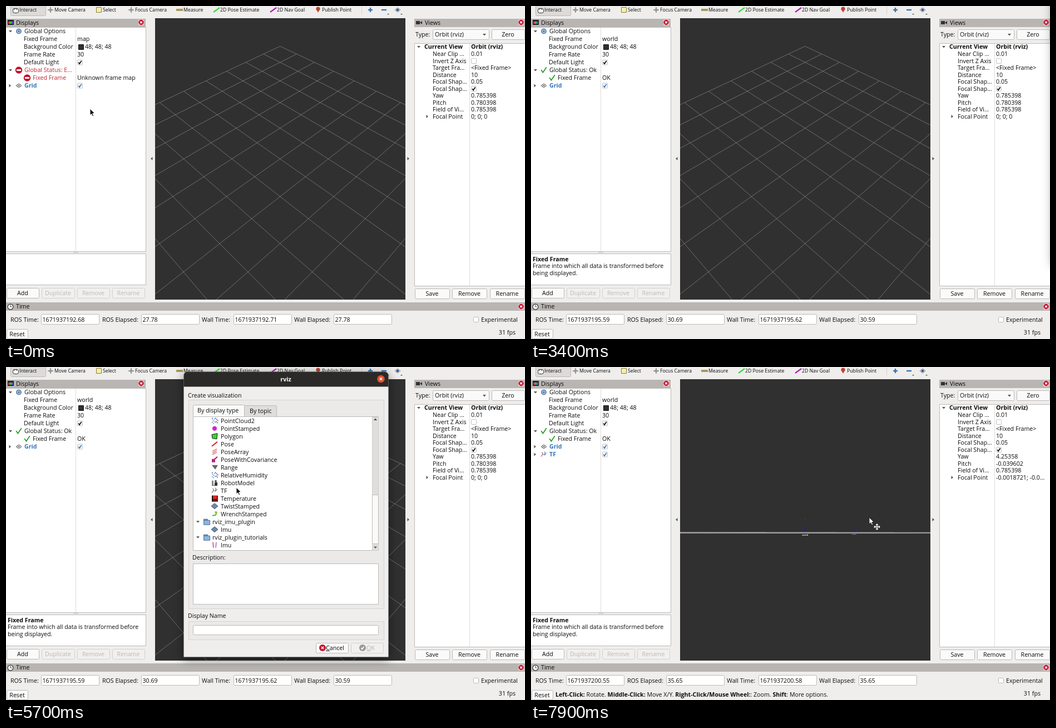
Animation, 933 px wide and 600 px high, one loop 8 s. Source, as an HTML page with a canvas:

```html
<!DOCTYPE html>
<html lang="en">
<head>
<meta charset="utf-8">
<style>
html, body { margin: 0; width: 100%; height: 100%; overflow: hidden; background: #efeeed; }
canvas { display: block; width: 933px; height: 600px; }
</style>
</head>
<body>
<canvas id="stage" width="933" height="600"></canvas>
<script>
const ctx = document.getElementById('stage').getContext('2d');
const INK = '#0c0c0c', BG = '#efeeed', BAR = '#b8b5b2', EDGE = '#bdbab7', BLUE = '#2f86bd', RED = '#c3142d', GREEN = '#1f9a25';
const SIZE = 10.65;

// ---- basic drawing helpers ----
function text(s, x, y, color = INK, bold = false, size = SIZE, align = 'left') {
  ctx.font = `${bold ? 700 : 500} ${size}px "Open Sans", sans-serif`;
  ctx.fillStyle = color;
  ctx.textAlign = align;
  ctx.fillText(s, x, y + size * .36);
  return ctx.measureText(s).width;
}
function rect(x, y, w, h, fill, stroke, r = 0) {
  ctx.beginPath();
  ctx.roundRect(x + .5, y + .5, w, h, r);
  if (fill) { ctx.fillStyle = fill; ctx.fill(); }
  if (stroke) { ctx.strokeStyle = stroke; ctx.lineWidth = 1; ctx.stroke(); }
}
function fill(x, y, w, h, color) { ctx.fillStyle = color; ctx.fillRect(x, y, w, h); }
function dot(x, y, r, color) {
  ctx.fillStyle = color;
  ctx.beginPath(); ctx.arc(x, y, r, 0, 7); ctx.fill();
}
function path(points, color, width = 1, x = 0, y = 0) {
  ctx.beginPath();
  for (let i = 0; i < points.length; i += 2) ctx.lineTo(x + points[i], y + points[i + 1]);
  ctx.strokeStyle = color; ctx.lineWidth = width; ctx.stroke();
}
function poly(points, color, x = 0, y = 0, outline) {
  ctx.beginPath();
  for (let i = 0; i < points.length; i += 2) ctx.lineTo(x + points[i], y + points[i + 1]);
  ctx.closePath();
  ctx.fillStyle = color; ctx.fill();
  if (outline) { ctx.strokeStyle = outline; ctx.lineWidth = 1; ctx.stroke(); }
}
const down = (x, y) => poly([-3, -1.5, 3, -1.5, 0, 2], '#555', x, y);
const right = (x, y) => poly([-1.5, -3, 2, 0, -1.5, 3], '#555', x, y);
const left = (x, y) => poly([1.5, -3, -2, 0, 1.5, 3], '#555', x, y);
const tick = (x, y, color = INK, s = 1) => path([-3 * s, 0, -s, 3 * s, 3 * s, -3 * s], color, 1.7, x, y);
function cross(x, y, r, color = '#fff') {
  path([-r, -r, r, r], color, 1.4, x, y);
  path([-r, r, r, -r], color, 1.4, x, y);
}
function button(x, y, w, h, label, off) {
  rect(x, y, w, h, off ? '#f1f0ef' : '#fafafa', off ? '#d3d1cf' : EDGE, 2);
  text(label, x + w / 2, y + h / 2 + .5, off ? '#bbb9b7' : INK, false, SIZE, 'center');
}
function check(x, y, on, color) {
  rect(x - 5, y - 5, 9, 9, '#fff', '#c4c1be', 1);
  if (on) tick(x, y, color, .9);
}
function titleBar(label, x, y, w, textX) {
  fill(x, y, w, 15, BAR);
  text(label, textX, y + 7.5);
}
function closeBox(x, y) {
  rect(x - 6, y - 6, 11, 11, '#f4eeee', '#cfa9ad', 3);
  dot(x, y, 4.7, RED);
  cross(x, y, 1.8);
}

// Linear interpolation through rows of [time, value, value...]
function key(t, rows) {
  const i = rows.findIndex(r => r[0] > t);
  if (i < 0) return rows.at(-1).slice(1);
  if (i === 0) return rows[0].slice(1);
  const a = rows[i - 1], b = rows[i], k = (t - a[0]) / (b[0] - a[0]);
  return a.slice(1).map((v, j) => v + (b[j + 1] - v) * k);
}

// ---- small icons, centred on x, y ----
const icons = {
  folder(x, y) { rect(x - 6, y - 5, 7, 4, '#6f9ac8', '#4a6f99'); rect(x - 6, y - 3, 11, 8, '#8fb4dc', '#4a6f99'); },
  diamond(x, y) { poly([0, -5, 6, 0, 0, 5, -6, 0], '#6f87ab', x, y, '#46566f'); },
  grid(x, y) {
    path([0, -3.5, 5, 0, 0, 3.5, -5, 0, 0, -3.5], '#555', 1, x, y);
    path([-2.5, -1.8, 2.5, 1.8], '#555', 1, x, y); path([2.5, -1.8, -2.5, 1.8], '#555', 1, x, y);
  },
  axes(x, y) { path([0, -5, 0, 1], '#2238b0', 1.6, x, y); path([0, 1, -5, 5], RED, 1.6, x, y); path([0, 1, 5, 4], '#2a9a2a', 1.4, x, y); },
  tf(x, y) {
    path([-5, 4, -2, 0, -3, -4], '#8a3030', 1, x, y); path([-2, 0, 2, 1, 5, -3], '#557a55', 1, x, y);
    path([2, 1, 2, -5], '#3344b0', 1, x, y);
  },
  robot(x, y) { fill(x - 5, y - 4, 3, 8, '#888'); fill(x, y - 1, 5, 6, '#333'); dot(x + 2, y - 3, 2, '#555'); fill(x - 5, y + 4, 10, 1, '#333'); },
  green(x, y) { fill(x - 5, y - 5, 4, 4, '#24d324'); fill(x + 1, y - 4, 4, 4, '#24d324'); fill(x - 4, y + 1, 8, 4, '#24d324'); },
  scene(x, y) { fill(x - 5, y - 5, 7, 3, '#222'); fill(x - 5, y, 4, 5, '#222'); fill(x, y - 1, 6, 6, '#24c324'); },
  curve(x, y) { path([-5, 5, -3, 0, 1, -3, 6, -4], '#40dd40', 2.5, x, y); },
  arrow(x, y) { path([-2, -5, 3, 0, -2, 5], '#318fc0', 2.4, x, y); },
  dark(x, y) { dot(x, y, 5, '#3e4a58'); dot(x + 1, y - 1, 2, '#8fa6bb'); },
  cloud(x, y) { fill(x - 6, y - 3, 12, 3, '#333'); fill(x - 4, y + 1, 8, 3, '#444'); },
  meter(x, y) { fill(x - 5, y - 5, 11, 11, '#252b55'); fill(x + 1, y - 4, 3, 9, '#e2d34a'); fill(x - 4, y - 2, 3, 4, '#ddd'); },
  brush(x, y) { path([-5, -5, 1, 1], '#333', 2, x, y); fill(x - 1, y + 1, 6, 4, '#c6a23c'); },
  frame(x, y) { rect(x - 5, y - 5, 10, 10, '#e6ecf2', '#44566f'); fill(x - 2, y - 2, 5, 5, '#566f93'); },
  points(x, y) { for (let i = 0; i < 12; i++) fill(x - 5 + i * 5 % 11, y - 5 + i * 7 % 10, 1.6, 1.6, i % 2 ? '#4b8fd0' : '#3b3b88'); },
  ball(x, y) { dot(x, y, 4, '#d322d3'); },
  polygon(x, y) { poly([-5, -3, 5, -5, 4, 5, -4, 4], '#35d335', x, y, '#222'); },
  pose(x, y) { path([-5, 4, 5, -4], '#d12222', 2, x, y); },
  poses(x, y) { for (const d of [-3, 0, 3]) path([-4, d + 2, 4, d - 2], '#d14444', 1.2, x, y); },
  covariance(x, y) { path([-4, 3, 5, -5], '#c21d3d', 2, x, y); fill(x - 5, y - 1, 6, 6, '#bd1e8a'); },
  range(x, y) { poly([-5, -4, 6, -4, 1, 4], '#666', x, y); },
  heat(x, y) { fill(x - 5, y - 5, 11, 11, '#701111'); fill(x - 3, y - 5, 7, 6, '#e62222'); fill(x - 5, y - 5, 2, 10, '#111'); },
  wrench(x, y) { path([-4, 3, 2, 2, 4, -4], '#3fbb3f', 2, x, y); dot(x + 2, y - 3, 2, '#d0b030'); },
  bars(x, y) { path([-3, -5, -2, 5], '#d06aa8', 2, x, y); path([3, -5, 2, 5], '#bb86cf', 2, x, y); },
  error(x, y) { dot(x, y, 6.2, RED); fill(x - 4, y - 1.5, 8, 3, '#fff'); },
  gear(x, y) { dot(x, y, 5, '#5f86b0'); dot(x, y, 3.2, '#a9c4e0'); dot(x, y, 1.5, '#476c96'); },
  move(x, y) { path([-5, 0, 5, 0], '#777', 1.4, x, y); path([0, -5, 0, 5], '#777', 1.4, x, y); dot(x, y, 2.6, '#999'); }
};

// ---- main window ----
function toolbar() {
  rect(8, -3, 63, 20, '#dddbd9', '#bbb8b5', 2);
  const item = (s, x) => text(s, x, 7, INK, false, 8.7);
  hand(17, 7);
  item('Interact', 24);
  icons.move(80, 7); item('Move Camera', 87);
  rect(162, 2, 9, 9, '#f7efa8', '#857c3a'); item('Select', 174);
  icons.move(225, 7); item('Focus Camera', 232);
  fill(306, 5, 12, 4, '#a99a55'); item('Measure', 319);
  path([373, 11, 384, 3], '#3bdc3b', 2.4); item('2D Pose Estimate', 385);
  path([475, 11, 486, 3], '#b422b4', 2.4); item('2D Nav Goal', 487);
  dot(561, 5, 3.6, '#b94433'); poly([-3, 6, 3, 6, 0, 12], '#b94433', 561, 0); item('Publish Point', 568);
  fill(639, 1, 1, 14, '#d5d3d1');
  path([651, 7, 659, 7], '#3474b5', 2.4); path([655, 3, 655, 11], '#3474b5', 2.4);
  path([675, 7, 684, 7], '#3474b5', 2.4);
  poly([-2, 0, 2, 0, 0, 2], '#555', 687, 14); poly([-2, 0, 2, 0, 0, 2], '#555', 711, 14);
  poly([-5, 0, 0, -4, 5, 0, 0, 4], '#d5dce5', 704, 7, '#889'); dot(704, 7, 2.3, '#335a8c');
}

function displays(t) {
  titleBar('Displays', 0, 23, 251, 18);
  rect(3, 25, 10, 8, '#2a3040', '#111'); fill(4, 28, 3, 4, '#e33'); fill(7, 28, 3, 4, '#3c3'); fill(10, 28, 3, 4, '#55f');
  closeBox(243, 29.5);
  rect(-1, 38, 252, 404, '#fff', EDGE);
  fill(125, 39, 1, 403, '#dedcda');
  const ok = t >= 2200, selected = t >= 600 && t < 2300, editing = t >= 1000 && t < 2300;
  const frameName = t < 2000 ? 'map' : 'world', tf = t >= 6400;
  if (selected) { fill(0, 53, 125, 13, BLUE); if (!editing) fill(125, 53, 126, 13, BLUE); }
  const row = (i, x, a, b, bx = 128, color = INK) => { text(a, x, 45.5 + i * 14, color); text(b, bx, 45.5 + i * 14); };
  down(8, 45.5); icons.gear(23, 45.5);
  row(0, 33, 'Global Options', '');
  text('Fixed Frame', 32, 59.5, selected ? '#fff' : INK);
  text(frameName, 128, 59.5, selected && !editing ? '#fff' : INK);
  row(2, 32, 'Background Color', '48; 48; 48', 142);
  rect(130, 69, 9, 9, '#303030', '#111');
  row(3, 32, 'Frame Rate', '30');
  row(4, 32, 'Default Light', ''); check(133, 101.5, true);
  down(8, 115.5);
  if (ok) { tick(23, 115, GREEN, 1.6); tick(38, 129, GREEN, 1.6); }
  else { icons.error(23, 115.5); icons.error(38, 129.5); }
  row(5, 33, ok ? 'Global Status: Ok' : 'Global Status: E…', '', 0, ok ? INK : '#bd2633');
  row(6, 48, 'Fixed Frame', ok ? 'OK' : 'Unknown frame map', 128, ok ? INK : '#bd2633');
  ['Grid', 'TF'].slice(0, tf ? 2 : 1).forEach((name, i) => {
    const y = 143.5 + i * 14;
    right(7, y); icons[name.toLowerCase()](23, y);
    text(name, 33, y, '#3577b5', true); check(133, y, true, '#3577b5');
  });
  if (editing) {
    rect(125, 52, 125, 14, '#fff', '#5d9ccb');
    const w = text(frameName, 129, 59.5);
    fill(129.5 + w, 54, 1, 11, '#111');
    fill(235, 53, 1, 13, '#9cc2de'); down(242, 60);
  }
  if (t >= 1500 && t < 2000) {
    rect(125, 67, 125, 43, '#fff', EDGE);
    const hover = t < 1800 ? 0 : 2;
    fill(126, 68 + hover * 14, 124, 14, BLUE);
    ['map', 'turtle1', 'world'].forEach((s, i) => text(s, 129, 75 + i * 14, i === hover ? '#fff' : INK));
  }
  rect(-1, 446, 252, 56, '#fff', EDGE);
  fill(121, 443.5, 9, 1, '#bbb');
  if (t >= 600) {
    text('Fixed Frame', 3, 456, INK, true);
    text('Frame into which all data is transformed before', 3, 468.5);
    text('being displayed.', 3, 481);
  }
  button(1, 508, 58, 18, 'Add');
  button(64, 508, 59, 18, 'Duplicate', true);
  button(128, 508, 58, 18, 'Remove', true);
  button(191, 508, 58, 18, 'Rename', true);
}

function views(yaw, pitch, focal) {
  titleBar('Views', 734, 23, 199, 753);
  fill(737, 27, 7, 6, '#333'); poly([744, 30, 748, 27, 748, 33], '#333');
  closeBox(926, 29.5);
  text('Type:', 736, 51.5);
  rect(767, 42, 101, 18, '#fafafa', EDGE, 2); text('Orbit (rviz)', 771, 51.5); down(860, 51.5);
  button(873, 42, 59, 18, 'Zero');
  rect(734, 67, 200, 437, '#fff', EDGE);
  fill(833, 68, 1, 436, '#dedcda');
  down(742, 73.5); right(757, 199);
  const rows = [['Near Clip …', '0.01'], ['Invert Z Axis', ''], ['Target Fra…', '<Fixed Frame>'], ['Distance', '10'],
    ['Focal Shap…', '0.05'], ['Focal Shap…', ''], ['Yaw', yaw], ['Pitch', pitch], ['Field of Vi…', '0.785398'], ['Focal Point', focal]];
  text('Current View', 752, 73.5, INK, true); text('Orbit (rviz)', 836, 73.5, INK, true);
  rows.forEach(([a, b], i) => { const y = 86.2 + i * 12.55; text(a, 767, y); text(b, 836, y); });
  check(841, 99, false); check(841, 149, true);
  button(735, 509, 62, 18, 'Save');
  button(802, 509, 62, 18, 'Remove');
  button(870, 509, 62, 18, 'Rename');
}

function timePanel(t) {
  titleBar('Time', 0, 534, 933, 18);
  dot(8, 542, 5.5, '#333'); dot(8, 542, 4.3, '#fff'); path([8, 538.5, 8, 542, 10.5, 542], '#333');
  closeBox(926, 541.5);
  const clock = key(t, [[0, 0], [1300, 1.25], [2900, 2.91], [6300, 2.91], [6400, 6.35], [6800, 6.75], [7900, 7.87]])[0];
  const lag = t === 0 || t >= 7500 ? 0 : t < 6400 ? .1 : .03;
  const fields = [['ROS Time:', 8, 63, 1671937192.68], ['ROS Elapsed:', 173, 243, 27.78],
    ['Wall Time:', 352, 409, 1671937192.71], ['Wall Elapsed:', 518, 589, 27.78 - lag]];
  for (const [label, x, boxX, start] of fields) {
    text(label, x, 565.5);
    rect(boxX, 555, 104, 18, '#fff', EDGE, 2);
    text((start + clock).toFixed(2), boxX + 2.5, 565);
  }
  rect(840, 560, 9, 9, '#fff', EDGE, 1); text('Experimental', 854, 565.5);
  button(1, 582, 38, 17, 'Reset');
  text(t >= 6400 && t < 7000 ? '0 fps' : '31 fps', 916, 588.5, INK, false, SIZE, 'right');
  if (t >= 6400) {
    let x = 44;
    ['Left-Click:', ' Rotate. ', 'Middle-Click:', ' Move X/Y. ', 'Right-Click/Mouse Wheel:', ': Zoom. ', 'Shift', ': More options.']
      .forEach((s, i) => x += text(s, x, 590.5, INK, i % 2 === 0));
  }
}

// ---- 3D view: orbit camera at distance 10 ----
function scene(yaw, pitch, lift, tf) {
  const cy = Math.cos(yaw), sy = Math.sin(yaw), cp = Math.cos(pitch), sp = Math.sin(pitch);
  const toCamera = ([x, y, z]) => {
    const a = x * cy + y * sy, h = z - lift;
    return [y * cy - x * sy, h * cp - a * sp, 10 - a * cp - h * sp];
  };
  const toScreen = ([x, y, d]) => [492.7 + 613 * x / d, 275.5 - 613 * y / d];
  const line = (p, q, color, width) => {
    let a = toCamera(p), b = toCamera(q);
    if (a[2] < b[2]) [a, b] = [b, a];
    const near = .05;
    if (a[2] < near) return;
    if (b[2] < near) {
      const k = (a[2] - near) / (a[2] - b[2]);
      b = a.map((v, i) => v + (b[i] - v) * k);
    }
    path([...toScreen(a), ...toScreen(b)], color, width);
  };
  const frames = tf ? [['world', 0], ['turtle1', 5.544]] : [];
  ctx.save();
  ctx.beginPath(); ctx.rect(268, 22, 450, 507); ctx.clip();
  fill(268, 22, 450, 507, '#303030');
  if (tf) line([0, 0, 0], [5.544, 5.544, 0], '#8c8c4c', 1);
  for (const [, p] of frames) {
    line([p, p, 0], [p + .2, p, 0], '#c01818', 1.4);
    line([p, p, 0], [p, p + .2, 0], '#18b018', 1.4);
    line([p, p, 0], [p, p, .2], '#1818c0', 1.4);
  }
  for (let i = -5; i <= 5; i++) {
    line([i, -5, 0], [i, 5, 0], 'rgba(160,160,164,.62)', .9);
    line([-5, i, 0], [5, i, 0], 'rgba(160,160,164,.62)', .9);
  }
  for (const [name, p] of frames) {
    const c = toCamera([p, p, -.04]);
    if (c[2] < .5) continue;
    const [x, y] = toScreen(c);
    text(name, x, y + 1, '#eee', true, Math.min(38 / c[2], 20), 'center');
  }
  if (lift) fill(492, 274.5, 1.5, 1, '#555');
  ctx.restore();
  left(262, 275); right(723, 275);
}

// ---- "create visualization" dialog ----
const plugins = `-moveit_ros_visualization MotionPlanning:arrow PlanningScene:scene RobotState:robot Trajectory:curve -rviz
 AccelStamped:diamond Axes:axes Camera:frame DepthCloud:cloud Effort:dark FluidPressure:meter Grid:grid GridCells:green
 Group:folder Illuminance:brush Image:frame InteractiveMarkers:arrow LaserScan:points Map:grid Marker:ball MarkerArray:green
 Odometry:poses Path:curve PointCloud:points PointCloud2:points PointStamped:ball Polygon:polygon Pose:pose PoseArray:poses
 PoseWithCovariance:covariance Range:range RelativeHumidity:points RobotModel:robot TF:tf Temperature:heat
 TwistStamped:diamond WrenchStamped:wrench -rviz_imu_plugin Imu:diamond -rviz_plugin_tutorials Imu:bars`.split(/\s+/);

function dialog(x, y, scroll, chosen) {
  ctx.save();
  ctx.translate(x, y);
  ctx.shadowColor = 'rgba(0,0,0,.5)'; ctx.shadowBlur = 18; ctx.shadowOffsetY = 4;
  rect(0, 0, 368, 514, BG, null, [7, 7, 0, 0]);
  ctx.shadowColor = 'transparent';
  rect(0, 0, 368, 27, '#2b2a29', null, [7, 7, 0, 0]);
  text('rviz', 184, 14, '#fff', true, SIZE, 'center');
  dot(355, 13.5, 6.8, '#e0512f'); cross(355, 13.5, 2.3);
  text('Create visualization', 8, 43);
  rect(9, 51, 351, 376, '#ebeae9', '#d6d4d2');
  rect(109, 61, 58, 20, '#dfdddb', EDGE, 2); text('By topic', 119, 71);
  rect(17, 60, 92, 22, '#fafafa', EDGE, 2); text('By display type', 25, 70.5);
  rect(17, 81, 333, 241, '#fff', EDGE);
  ctx.save();
  ctx.beginPath(); ctx.rect(18, 82, 321, 240); ctx.clip();
  plugins.forEach((entry, i) => {
    const rowY = 88.7 + (i - scroll) * 14;
    if (rowY < 75 || rowY > 330) return;
    if (entry[0] === '-') {
      down(26, rowY); icons.folder(42, rowY); text(entry.slice(1), 52, rowY);
      return;
    }
    const [name, icon] = entry.split(':'), lit = chosen && name === 'TF';
    if (lit) fill(48, rowY - 7, 291, 14, BLUE);
    icons[icon](56, rowY);
    text(name, 67, rowY, lit ? '#fff' : INK);
  });
  ctx.restore();
  rect(339, 82, 11, 240, '#e0dedc', '#cfcccb');
  rect(339, 92 + scroll * 5.2, 11, 88, '#fafafa', EDGE);
  poly([-3, 1.5, 3, 1.5, 0, -2], '#444', 345, 86.5); down(345, 317);
  text('Description:', 16, 335);
  rect(17, 346, 333, 73, '#fff', EDGE);
  text('Display Name', 8, 440);
  rect(9, 450, 351, 33, '#ebeae9', '#d6d4d2');
  rect(17, 457, 333, 17, '#fff', EDGE, 2);
  if (chosen) {
    text('Displays the TF transform hierarchy.', 21, 356);
    text('TF', 21, 466);
  }
  button(238, 489, 58, 18, '');
  dot(250, 498, 6, RED); cross(250, 498, 2.3);
  text('Cancel', 256, 498); fill(256, 503, 7, 1, INK);
  button(301, 489, 58, 18, '', !chosen);
  dot(322, 498, 6, chosen ? GREEN : '#9b9997'); tick(322, 498, '#fff', .8);
  text('OK', 329, 498, chosen ? INK : '#b5b3b1'); fill(329, 503, 8, 1, chosen ? INK : '#b5b3b1');
  ctx.restore();
}

// ---- pointers ----
function hand(x, y) {
  rect(x - 5, y - 3, 10, 8, '#fff', '#222', 3);
  path([-2, -3, -2, 0], '#222', 1, x, y); path([2, -3, 2, 0], '#222', 1, x, y);
}
function pointer(x, y, orbit, pan) {
  poly([0, 0, 0, 12, 2.8, 9.6, 4.8, 14, 6.8, 13, 4.8, 8.8, 8.4, 8.4], orbit ? '#fff' : '#111', x, y, orbit ? '#222' : '#fff');
  if (!orbit) return;
  x += 14; y += 17;
  path([-5, 0, 5, 0], '#fff', 1.4, x, y); path([0, -5, 0, 5], '#fff', 1.4, x, y);
  if (pan) for (const s of [-1, 1]) {
    poly([s * 6, 0, s * 3, -2.5, s * 3, 2.5], '#fff', x, y);
    poly([0, s * 6, -2.5, s * 3, 2.5, s * 3], '#fff', x, y);
  } else {
    path([-5, -2, -5, 1, 0, 3, 5, 1, 5, -2], '#fff', 1.2, x, y);
    poly([-2.5, 3, 2.5, 3, 0, 6], '#fff', x, y);
  }
}

const cursorKeys = [[0, 151, 185], [500, 100, 60], [700, 165, 48], [900, 205, 55], [1300, 246, 59], [1500, 243, 60],
  [1900, 160, 98], [2100, 160, 98], [2700, 45, 490], [2900, 30, 515], [3100, 30, 515], [3400, 960, 150], [4000, 1000, 60],
  [4200, 740, 140], [4300, 643, 125], [4500, 645, 23], [4700, 645, 23], [4900, 480, 260], [5100, 426, 290], [5300, 420, 270],
  [5400, 402, 225], [5500, 410, 204], [5600, 410, 204], [5700, 414, 217], [5900, 414, 217], [6200, 650, 505], [6400, 650, 505],
  [6800, 450, 366], [7600, 608, 248], [7900, 608, 271]];
const dialogKeys = [[4000, 938, -52], [4100, 740, 20], [4200, 410, 92], [4300, 317, 86], [4400, 318, 34], [4500, 319, 8]];

function draw(t) {
  fill(0, 0, 933, 600, BG);
  const [yaw, pitch, lift] = key(t, [[6600, .785398, .780398, 0], [6800, .760398, .785398, 0],
    [7600, -2.029605, -.039602, 0], [7900, -2.029605, -.039602, .382]]);
  const yawText = yaw < 0 ? (yaw + 2 * Math.PI).toFixed(5) : yaw.toFixed(6);
  toolbar();
  displays(t);
  if (t <= 6800) scene(Math.PI / 4, .780398, 0, t >= 6400);
  else scene(yaw, pitch, lift, true);
  views(yawText, pitch.toFixed(6), lift ? '-0.0018721; -0.0…' : '0; 0; 0');
  timePanel(t);
  if (t >= 3200 && t < 6400) {
    const [x, y] = key(t, dialogKeys);
    const [scroll] = key(t, [[4700, 0], [4800, 6], [4900, 14], [5000, 20], [5100, 25]]);
    dialog(Math.round(x), Math.round(y), scroll, t >= 5900);
  }
  const [cx, cy] = key(t, cursorKeys);
  if (t >= 4100 && t < 4800) hand(cx, cy);
  else pointer(cx, cy, t >= 6500, t >= 7600);
}

let shown = -1;
function tickFrame(now) {
  const t = Math.floor(now % 8000 / 100) * 100;
  if (t !== shown) draw(shown = t);
  requestAnimationFrame(tickFrame);
}
draw(0);
requestAnimationFrame(tickFrame);
</script>
</body>
</html>
```
